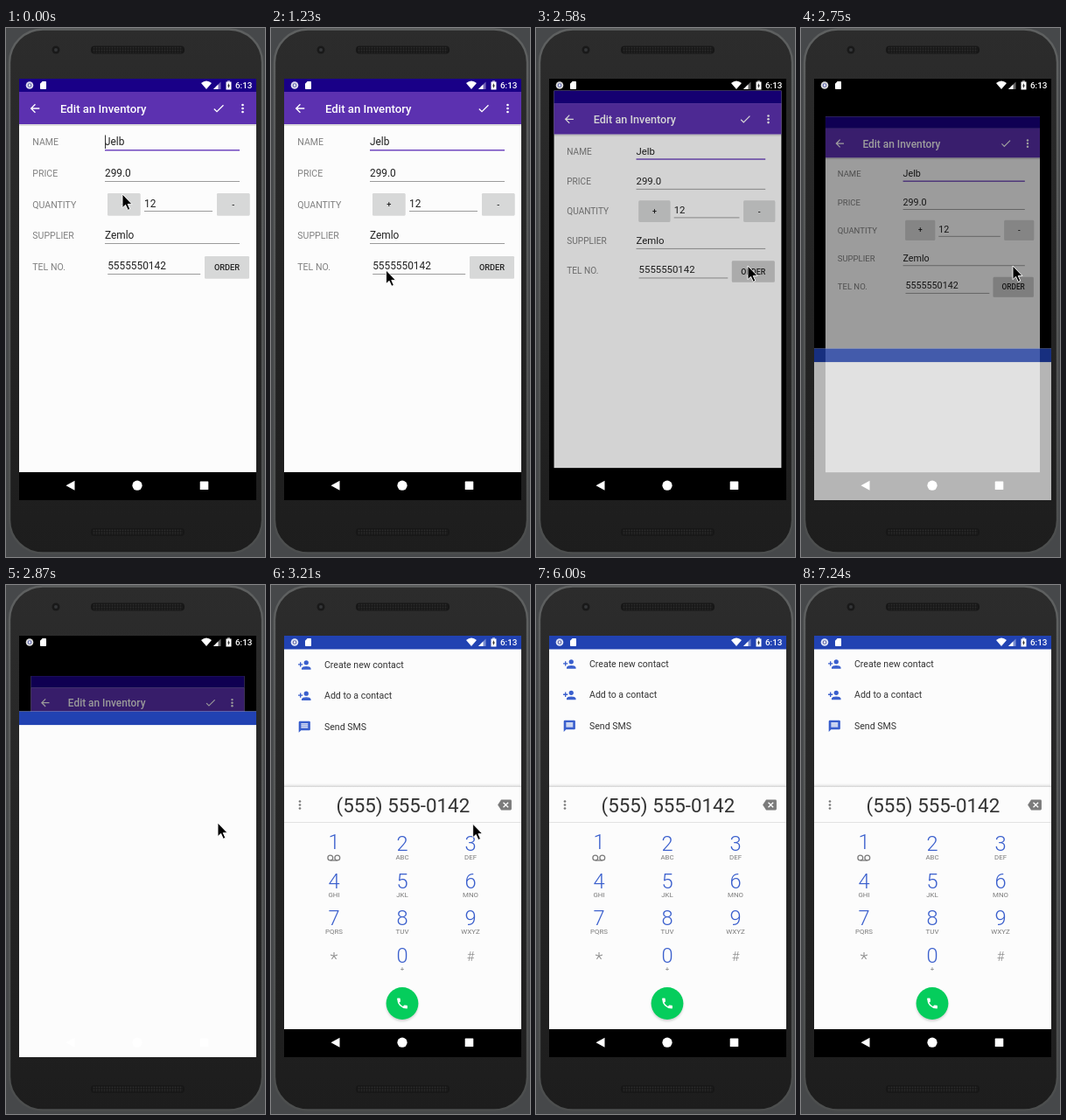
An HTML page that plays this animation: 296 by 605 pixels, repeating every 7.6 s.

```html
<!DOCTYPE html>
<html lang="en">
<head>
<meta charset="utf-8">
<title>Inventory order</title>
<style>
html, body { margin: 0; width: 100%; height: 100%; overflow: hidden; background: #46484a; }
svg { display: block; width: 100%; height: 100%; font-family: Roboto, sans-serif; }
</style>
</head>
<body>
<svg id="stage" viewBox="0 0 296 605" xmlns="http://www.w3.org/2000/svg"></svg>
<script>
const LOOP = 7600;
const PHONE = '5555550142';
const BLUE = '#3a5fcd', GREY = '#7b7b7b', INK = '#212121', PAPER = '#fcfcfc';

// Icons on a 24 unit grid.
const ICONS = {
  back: 'M20 11H8L13.4 5.4 12 4 4 12 12 20 13.4 18.6 8 13H20z',
  check: 'M9 16.2L4.8 12 3.4 13.4 9 19 21 7 19.6 5.6z',
  addPerson: 'M15 4a4 4 0 0 1 0 8a4 4 0 0 1 0-8zM6 10V7H4V10H1V12H4V15H6V12H9V10zM7 20V18C7 13 23 13 23 18V20z',
  message: 'M2 22V4Q2 2 4 2H20Q22 2 22 4V16Q22 18 20 18H6zM6 6V8H18V6zM6 9V11H18V9zM6 12V14H18V12z',
  erase: 'M0 12L6 3H22Q24 3 24 5V19Q24 21 22 21H6zM9 8.4L12.6 12 9 15.6 10.4 17 14 13.4 17.6 17 19 15.6 15.4 12 19 8.4 17.6 7 14 10.6 10.4 7z',
  call: 'M3 4Q3 3 4 3H7.5Q8.5 3 8.5 4L9 8.6 6.6 10.8Q9 15 13.2 17.4L15.4 15 20 15.5Q21 15.5 21 16.5V20Q21 21 20 21Q4 20 3 4z',
  card: 'M18 2H10L4 8V20Q4 22 6 22H18Q20 22 20 20V4Q20 2 18 2z'
};

const rect = (x, y, w, h, fill, extra = '') =>
  `<rect x="${x}" y="${y}" width="${w}" height="${h}" fill="${fill}" ${extra}/>`;
const dot = (x, y, r, fill, extra = '') =>
  `<circle cx="${x}" cy="${y}" r="${r}" fill="${fill}" ${extra}/>`;
const shape = (d, fill, extra = '') => `<path d="${d}" fill="${fill}" ${extra}/>`;
const text = (s, x, y, size, fill, extra = '') =>
  `<text x="${x}" y="${y}" font-size="${size}" fill="${fill}" ${extra}>${s}</text>`;
const middle = (s, x, y, size, fill, weight = 400) =>
  text(s, x, y, size, fill, `text-anchor="middle" font-weight="${weight}"`);
const icon = (name, x, y, fill, scale = 0.659) =>
  shape(ICONS[name], fill, `fill-rule="evenodd" transform="translate(${x} ${y}) scale(${scale}) translate(-12 -12)"`);
const more = (x, y, fill) => [-4, 0, 4].map(d => dot(x, y + d, 1.35, fill)).join('');
const group = (id, body) => `<g id="${id}">${body}</g>`;

function phoneBody() {
  const speaker = y => rect(97, y, 107, 9, '#171717', 'rx="4"') +
    rect(99, y + 1, 103, 7, 'url(#mesh)', 'rx="3"');
  return rect(0, 0, 296, 605, '#46484a') +
    rect(4, 1.5, 289, 599, 'url(#face)', 'rx="38" stroke="url(#rim)" stroke-width="2.4"') +
    dot(57, 25, 4.5, '#191919') + dot(57, 25, 2, '#343638') +
    speaker(20.5) + speaker(572);
}

const rowY = i => 134.4 + 35.6 * i;

function field(value, x, y, w) {
  return text(value, x, y, 11.87, INK) + rect(x, Math.floor(y + 5.3), w, 1, '#9b9b9b');
}

function button(id, label, x, y, w) {
  return rect(x, y + 0.7, w, 25, '#000', 'rx="1.3" opacity=".14"') +
    rect(x, y, w, 25, '#d7d8d8', `rx="1.3" id="${id}"`) +
    middle(label, x + w / 2, y + 16, 9.2, INK, 500);
}

function formScreen() {
  const labels = ['NAME', 'PRICE', 'QUANTITY', 'SUPPLIER', 'TEL NO.'];
  return rect(15, 58, 271, 450, PAPER) + rect(15, 110, 271, 2, '#000', 'opacity=".13"') +
    rect(15, 58, 271, 15, '#190087') + rect(15, 73, 271, 37, '#5c31b0') +
    icon('back', 33, 92, '#fff') + icon('check', 243, 92, '#fff') + more(270.5, 92, '#fff') +
    text('Edit an Inventory', 62, 97, 13.2, '#fff', 'font-weight="500"') +
    labels.map((s, i) => text(s, 30.3, rowY(i), 10.55, '#808080')).join('') +
    text('Jelb', 113, rowY(0), 11.87, INK) + rect(113, 139, 154, 1.5, '#7148c0') +
    rect(113, 122.5, 1, 15.5, '#333', 'id="caret"') +
    field('299.0', 113, rowY(1), 154) + field('12', 158, rowY(2) - 1, 78) +
    field('Zemlo', 113, rowY(3), 154) + field(PHONE, 116.2, rowY(4) - 1, 106) +
    button('plus', '+', 116, 189, 37.5) + button('minus', '-', 241, 189, 37.5) +
    button('order', 'ORDER', 227, 261, 51);
}

function keypad() {
  const hints = ',ABC,DEF,GHI,JKL,MNO,PQRS,TUV,WXYZ,,+'.split(',');
  const keys = [...'123456789*0#'].map((key, i) => {
    const x = 72 + (i % 3) * 78, y = 304 + Math.floor(i / 3) * 42.5;
    if (key === '*') return middle(key, x, y + 3, 21, '#8a8a8a', 300);
    if (key === '#') return middle(key, x, y - 1.5, 15, '#8a8a8a', 300);
    return middle(key, x, i ? y : y - 2.5, 23.7, BLUE, 300) + middle(hints[i], x, y + 10.4, 7.9, GREY);
  });
  const reel = x => dot(x, 312, 2.9, 'none', `stroke="${GREY}" stroke-width="1.3"`);
  return keys.join('') + reel(67.8) + reel(75.8) + rect(67.8, 314.3, 8, 1.3, GREY);
}

function dialerScreen() {
  const rows = ['Create new contact', 'Add to a contact', 'Send SMS'];
  const number = PHONE.replace(/(...)(...)(.*)/, '($1) $2-$3');
  const list = rows.map((s, i) =>
    icon(i < 2 ? 'addPerson' : 'message', 38.3, 90.5 + i * 35.4, BLUE) +
    text(s, 61, 94 + i * 35.4, 10.55, '#333')).join('');
  const pad = rect(15, 226, 271, 5, 'url(#edge)') + rect(15, 231, 271, 277, PAPER) +
    rect(15, 271, 271, 0.8, '#dcdcdc') + more(33, 251.5, GREY) +
    text(number, 74.5, 260, 22.35, '#333') + icon('erase', 267, 251.5, GREY) + keypad() +
    dot(150, 480.5, 18, '#000', 'opacity=".2" filter="url(#soft)"') +
    dot(150, 478.5, 18.4, '#05cd5c') + icon('call', 150, 478.5, '#fff');
  return rect(15, 58, 271, 482, PAPER) + rect(15, 58, 271, 15.5, '#2142b2') +
    group('list', list) + group('pad', pad);
}

function systemIcons() {
  return dot(27, 65.5, 4.3, '#fff', 'opacity=".85"') + dot(27, 65.5, 2.3, '#5a62a8') +
    dot(27, 65.5, 1.2, '#fff') + icon('card', 42.5, 65.5, '#fff', 0.44) +
    shape('M223 63Q229 58 235 63L229 70z', '#fff') +
    shape('M237 70H245.5V61.5z', '#fff', 'opacity=".4"') + shape('M237 70H242.5V64.5z', '#fff') +
    rect(251.5, 61.5, 6, 9, '#fff') + rect(253, 60.5, 3, 1, '#fff') +
    shape('M255 63L253 66.5H254V69L256 65.5H255z', '#333') +
    text('6:13', 262, 69.2, 9.9, '#fff', 'font-weight="500"') +
    shape('M68.5 523.2L78.5 517.7V528.7z', '#fff') + dot(150, 523.2, 5.6, '#fff') +
    rect(221.7, 518.5, 9.6, 9.6, '#fff', 'rx=".6"');
}

const fade = (id, from, to, extra = '') =>
  `<linearGradient id="${id}" x2="0" y2="1"><stop stop-color="${from}" ${extra}/><stop offset="1" stop-color="${to}"/></linearGradient>`;

const stage = document.getElementById('stage');
stage.innerHTML = '<defs>' + fade('face', '#2c2c2c', '#1d1d1d') + fade('rim', '#5e6060', '#4c4e4e') +
  fade('edge', '#fcfcfc', '#d0d0d0', 'stop-opacity="0"') +
  `<pattern id="mesh" width="3" height="3" patternUnits="userSpaceOnUse">${dot(1.5, 1.5, 0.9, '#2c2c2c')}</pattern>
  <filter id="soft" x="-30%" y="-30%" width="160%" height="160%"><feGaussianBlur stdDeviation="1.8"/></filter>
  <clipPath id="screen">${rect(15, 58, 271, 482, '#000')}</clipPath></defs>` +
  phoneBody() + '<g clip-path="url(#screen)">' + rect(15, 58, 271, 482, '#000') +
  group('form', formScreen()) + rect(15, 58, 271, 482, '#000', 'id="dim"') +
  group('dialer', dialerScreen()) + rect(15, 508, 271, 32, '#000', 'id="nav"') +
  systemIcons() + '</g>' +
  group('pointer', shape('M0 0V15.6L3.6 12.3 6.3 18.3 8.8 17.2 6.2 11.4H11z', '#000',
    'stroke="#fff" stroke-width=".9" stroke-linejoin="round"'));

const ease = (t, from, to) => {
  const p = Math.min(1, Math.max(0, (t - from) / (to - from)));
  return p * p * (3 - 2 * p);
};
const swing = (t, peak, period) => Math.cos(2 * Math.PI * (t - peak) / period);

// The pointer sweeps under the typed number, presses ORDER, sweeps under
// the dialled number, then leaves and looks in once more.
const underField = t => [178 + 53 * swing(Math.min(t, 1700), 600, 1500), 277];
const underDialled = t => [168 + 61 * swing(t, 3240, 1400), 274 - 12 * ease(t, 3100, 3900)];
const STOPS = [
  { from: 120, to: 600, at: underField },
  { from: 1930, to: 2170, at: () => [242, 272] },
  { from: 2950, to: 3300, at: underDialled },
  { from: 5250, to: 5600, at: () => [220, 445] },
  { from: 5660, to: 6000, at: () => [207, 605] },
  { from: 6660, to: 6940, at: () => [178, 534] },
  { from: 7120, to: 7260, at: () => [214, 575] }
];

function pointerAt(t) {
  let [x, y] = [133, 190];
  for (const { from, to, at } of STOPS) {
    const k = ease(t, from, to), [nx, ny] = at(t);
    x += (nx - x) * k;
    y += (ny - y) * k;
  }
  return [x, y];
}

function set(id, attrs) {
  const el = document.getElementById(id);
  for (const name in attrs) el.setAttribute(name, attrs[name]);
}
const move = (x, y) => `translate(${x} ${y})`;
const seen = on => on ? 'visible' : 'hidden';

function draw(t) {
  const away = ease(t, 2408, 2798);
  set('form', { transform: `${move(150.3, 299 + 22 * away * away)} scale(${1 - 0.1 * away}) ${move(-150.3, -299)}` });
  set('dim', { opacity: 0.4 * away });
  set('caret', { visibility: seen((t + 350) % 1000 < 500 && t < 2340) });
  set('order', { fill: t < 2200 ? '#d7d8d8' : '#cccccc' });

  const enter = ease(t, 2600, 2970);
  set('dialer', { visibility: seen(enter > 0), opacity: Math.min(1, 2 * enter), transform: move(0, 482 * (1 - enter)) });
  set('nav', { visibility: seen(enter === 0 || enter === 1) });
  set('list', { opacity: ease(t, 2960, 3080), transform: move(0, 1 - ease(t, 3180, 3400)) });
  set('pad', { transform: move(0, 282 * (1 - ease(t, 2970, 3200))) });

  set('pointer', { transform: move(...pointerAt(t)), visibility: seen(t < 6000 || (t >= 6720 && t < 7240)) });
}

let start;
function tick(now) {
  start ??= now;
  draw((now - start) % LOOP);
  requestAnimationFrame(tick);
}
draw(0);
requestAnimationFrame(tick);
</script>
</body>
</html>
```
